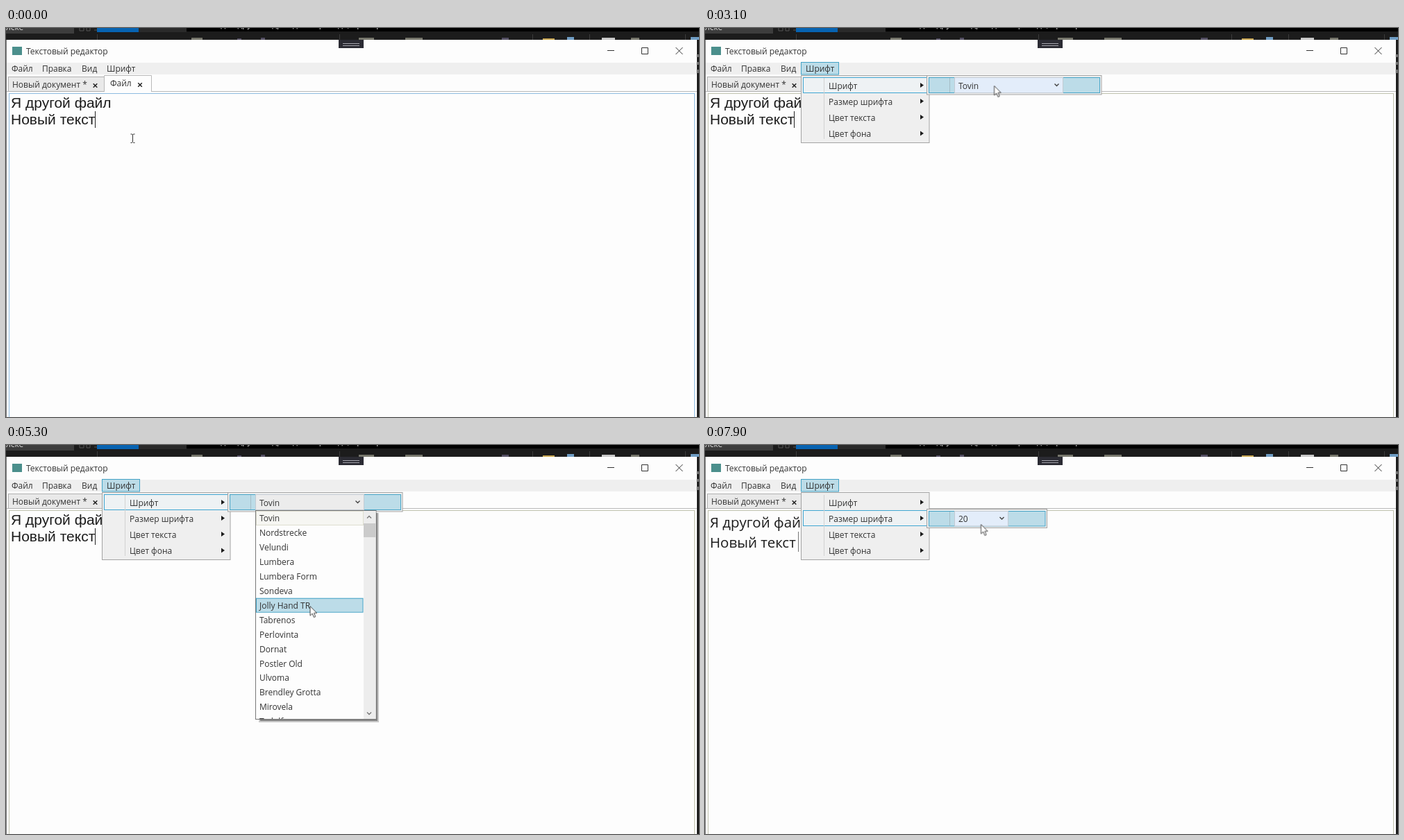
These frames come from a looping animation (998 px wide and 561 px high, 8000 ms). An HTML page:

```html
<!DOCTYPE html>
<html lang="ru">
<head>
<meta charset="utf-8">
<title>Текстовый редактор</title>
<style>
html, body { margin: 0; width: 100%; height: 100%; overflow: hidden; background: #1c1c1c; }
svg { display: block; width: 100%; height: 100%; }
text { font: 12px "Open Sans", "Noto Sans", sans-serif; fill: #333; white-space: pre; }
.plain text { font: 21px "Liberation Sans", sans-serif; fill: #1c1c1c; }
.casual text { font: 500 20.5px "Open Sans", "Noto Sans", sans-serif; fill: #1c1c1c; }
.hot { fill: #bcdce8; stroke: #45a3c6; }
.lit { fill: #eef2f4; stroke: #3fa6d2; }
.popup { fill: #efefef; stroke: #a3a3a3; }
.gutter { stroke: #d2d2d2; }
.line { fill: none; stroke: #333; }
.chevron { fill: none; stroke: #444; stroke-width: 1.4; }

/* Percentages are milliseconds / 80. */
.t { animation: 8s step-end infinite; }
.fade { animation-timing-function: linear; }
#beam { animation-name: beam; }
#arrow { animation-name: arrow; }
#pointer { animation-name: pointer; animation-timing-function: ease-in-out; }
#focus { animation-name: focus; }
#topHot { animation-name: topHot; }
#menu { animation-name: menu; }
#fontLit { animation-name: fontLit; }
#sizeLit { animation-name: sizeLit; }
#fontSub { animation-name: fontSub; }
#fontHot { animation-name: fontHot; }
#fontCombo { animation-name: fontCombo; }
#sizeSub { animation-name: sizeSub; }
#sizeHot { animation-name: sizeHot; }
#sizeCombo { animation-name: sizeCombo; }
#list { animation-name: list; }
#row { animation-name: row; }
.before { animation-name: before; }
.after { animation-name: after; }

@keyframes beam { 0% { opacity: 1 } 9.25%, 100% { opacity: 0 } }
@keyframes arrow { 0% { opacity: 0 } 9.25%, 100% { opacity: 1 } }
@keyframes pointer {
  0%, 3.1% { transform: translate(182px, 159px) }
  13.1%, 21.2% { transform: translate(174.5px, 52.5px) }
  25%, 31.8% { transform: translate(188.5px, 81.5px) }
  40%, 53.1% { transform: translate(427.5px, 83.5px); animation-timing-function: linear }
  58.1% { transform: translate(440px, 297px); animation-timing-function: linear }
  63.4%, 72.1% { transform: translate(438px, 232.5px) }
  77.5% { transform: translate(428px, 88px) }
  81.6% { transform: translate(302px, 89px) }
  85%, 94.6% { transform: translate(282px, 107.5px) }
  98.7%, 100% { transform: translate(397.5px, 114.5px) }
}
@keyframes focus { 0% { stroke: #8dbbe0 } 16.75%, 100% { stroke: #bfc1ad } }
@keyframes topHot { 0% { opacity: 0 } 11.9%, 100% { opacity: 1 } }
@keyframes menu { 0%, 16.75% { opacity: 0 } 19.25%, 100% { opacity: 1 } }
@keyframes fontLit { 0% { opacity: 0 } 23.5% { opacity: 1 } 82.5%, 100% { opacity: 0 } }
@keyframes sizeLit { 0% { opacity: 0 } 82.5%, 100% { opacity: 1 } }
@keyframes fontSub { 0%, 29.6% { opacity: 0 } 32.1%, 87.8% { opacity: 1 } 87.81%, 100% { opacity: 0 } }
@keyframes fontHot { 0% { opacity: 0 } 35.6% { opacity: 1 } 80.6%, 100% { opacity: 0 } }
@keyframes fontCombo {
  0% { fill: #ececec } 36.5% { fill: #e3edfa } 53.4% { fill: #ececec }
  76.9% { fill: #e3edfa } 79.5%, 100% { fill: #ececec }
}
@keyframes sizeSub { 0%, 88.4% { opacity: 0 } 90.9%, 100% { opacity: 1 } }
@keyframes sizeHot { 0% { opacity: 0 } 96.3%, 100% { opacity: 1 } }
@keyframes sizeCombo { 0% { fill: #ececec } 97%, 100% { fill: #e3edfa } }
@keyframes list {
  0%, 43.3% { clip-path: inset(0 0 100% 0) }
  45.5%, 68.7% { clip-path: inset(0 0 0 0) }
  68.75%, 100% { clip-path: inset(0 0 100% 0) }
}
@keyframes row {
  0% { transform: none }
  53.4% { transform: none; animation-timing-function: steps(9) }
  57.8% { transform: translateY(188.6px) }
  59.2% { transform: translateY(167.6px) }
  60.9% { transform: translateY(146.7px) }
  62.6%, 100% { transform: translateY(125.7px) }
}
@keyframes before { 0% { opacity: 1 } 69.2%, 100% { opacity: 0 } }
@keyframes after { 0% { opacity: 0 } 69.2%, 100% { opacity: 1 } }
</style>
</head>
<body>
<svg viewBox="0 0 998 561" preserveAspectRatio="none">
  <defs>
    <path id="sub" d="M0-3.5 5 0 0 3.5z" fill="#1c1c1c"/>
    <path id="x" d="M-2.8-2.8 2.8 2.8M2.8-2.8-2.8 2.8" stroke="#222" stroke-width="1.5"/>
    <path id="down" class="chevron" d="M-3-1.5 0 1.5 3-1.5"/>
  </defs>

  <!-- Strip of the program behind the window -->
  <rect width="998" height="561" fill="#1c1c1c"/>
  <path fill="#3d3d3d" d="M0 0H98V8H0z"/>
  <path fill="#0763b1" d="M131 0H191V6H131z"/>
  <path fill="#2a2a2a" d="M191 0H260V6H191z"/>
  <path fill="#000" d="M260 0H998V5H260z"/>
  <text x="0" y="3" style="fill:#ddd">лске</text>
  <text x="286" y="-1" style="fill:#ddd">Найден другой адрес для перехода, проверьте</text>
  <path fill="none" stroke="#555" d="M106 0V4H112V0M116 0V4H121V0M127 3H131"/>
  <path stroke="#3c3c3c" d="M131.500 9V17M480.500 9V17M758.500 9V17M840.500 9V17M978.500 9V17"/>
  <path fill="#77776c" d="M267 14H283V17H267zM508 14H530V17H508zM575 14H600V17H575zM900 14H912V17H900z"/>
  <path fill="#555064" d="M333 15H339V17H333zM367 14H373V17H367zM714 14H724V17H714z"/>
  <path fill="#c8a650" d="M773 15H790V17H773z"/>
  <path fill="#6f9dc4" d="M808 13H818V17H808zM986 13H998V17H986z"/>
  <path fill="#c8c8c8" d="M858 14H877V17H858z"/>

  <!-- Window frame -->
  <path fill="#fdfdfd" d="M0 17H995V561H0z"/>
  <path fill="#efefef" d="M1 50H995V67H1z"/>
  <path stroke="#777" d="M.5 17V561"/>
  <path stroke="#ddd" d="M996.500 38V42M996.500 49V53M996.500 60V65"/>
  <path fill="#2b2b33" d="M479 17H515V29H479z"/>
  <path stroke="#a5a5ad" d="M485 22.500H509M485 25.500H509"/>
  <rect x="9" y="27" width="14" height="12" fill="#4b8f8c"/>
  <text x="29" y="37.500">Текстовый редактор</text>
  <path class="line" d="M866 32.500H876M915.500 28.500H924.500V37.500H915.500zM964.500 28 974.500 38M974.500 28 964.500 38"/>

  <text x="8" y="63">Файл</text>
  <text x="52" y="63">Правка</text>
  <text x="109" y="63">Вид</text>
  <rect id="topHot" class="t hot" x="138.500" y="49.500" width="54" height="17.500"/>
  <text x="145" y="63">Шрифт</text>

  <!-- Tabs and document -->
  <path fill="#fdfdfd" stroke="#b9b9b9" d="M1 91.500H995"/>
  <rect x="3.500" y="70.500" width="138" height="21" fill="#e9e9e9" stroke="#b0b0b0"/>
  <path fill="#fdfdfd" stroke="#b9b9b9" d="M141.500 92V68.500H209.500V92"/>
  <text x="9" y="85.500">Новый документ *</text>
  <text x="150" y="84">Файл</text>
  <use href="#x" x="128.500" y="83"/>
  <use href="#x" x="193" y="82"/>
  <rect id="focus" class="t" x="4.500" y="94.500" width="987" height="480" fill="#fdfdfd"/>
  <g class="t plain before">
    <text x="7" y="114.500">Я другой файл</text>
    <text x="7" y="139">Новый текст</text>
    <path stroke="#222" d="M128.500 120V144"/>
  </g>
  <g class="t casual after">
    <text x="7" y="119">Я другой файл</text>
    <text x="7" y="147.500">Новый текст</text>
    <path stroke="#777" d="M134.500 125V154"/>
  </g>

  <!-- Font menu -->
  <g id="menu" class="t fade">
    <rect class="popup" x="138.500" y="68.500" width="184.500" height="97"/>
    <rect id="fontLit" class="t lit" x="141.500" y="71.500" width="179" height="22"/>
    <rect id="sizeLit" class="t lit" x="141.500" y="94.500" width="179" height="22"/>
    <path class="gutter" d="M171.500 72V160"/>
    <text x="178" y="87.500">Шрифт</text>
    <text x="178" y="110.500">Размер шрифта</text>
    <text x="178" y="133.500">Цвет текста</text>
    <text x="178" y="156.500">Цвет фона</text>
    <use href="#sub" x="310" y="82.500"/>
    <use href="#sub" x="310" y="105.500"/>
    <use href="#sub" x="310" y="128.500"/>
    <use href="#sub" x="310" y="152"/>
  </g>

  <g id="fontSub" class="t fade">
    <rect class="popup" x="319.500" y="68.500" width="251.500" height="27.500"/>
    <rect id="fontHot" class="t hot" x="322.500" y="71.500" width="246" height="22"/>
    <path class="gutter" d="M352.500 72V93" style="stroke:#a5bcc6"/>
    <rect id="fontCombo" class="t" x="359.500" y="71.500" width="156" height="22" stroke="#c3cbd3"/>
    <text class="t before" x="365" y="87.500">Tovin</text>
    <text class="t after" x="365" y="87.500">Jolly Hand TR</text>
    <use href="#down" x="506.500" y="82"/>
  </g>

  <g id="sizeSub" class="t fade">
    <rect class="popup" x="319.500" y="92.500" width="173" height="27"/>
    <rect id="sizeHot" class="t hot" x="322.500" y="95.500" width="167.500" height="21.500"/>
    <path class="gutter" d="M352.500 96V117" style="stroke:#a5bcc6"/>
    <rect id="sizeCombo" class="t" x="359.500" y="95.500" width="77" height="21.500" stroke="#c3cbd3"/>
    <text x="365" y="110.500">20</text>
    <use href="#down" x="427.500" y="105.500"/>
  </g>

  <!-- Drop-down list -->
  <g id="list" class="t fade">
    <path fill="#000" fill-opacity=".2" d="M364 98H537V400H364z"/>
    <path fill="#000" fill-opacity=".35" d="M366 98H535V398H366z"/>
    <rect x="359.500" y="94.500" width="173.500" height="301" fill="#fdfdfd" stroke="#777"/>
    <rect x="360.500" y="95.500" width="154" height="20" fill="#f6f6f2" stroke="#deded0"/>
    <rect id="row" class="t hot" x="360.500" y="95.500" width="153.500" height="20"/>
    <svg x="360" y="95" width="155" height="300" viewBox="360 95 155 300" style="width:155px;height:300px">
      <text y="110">
        <tspan x="365">Tovin</tspan>
        <tspan x="365" dy="20.950">Nordstrecke</tspan>
        <tspan x="365" dy="20.950">Velundi</tspan>
        <tspan x="365" dy="20.950">Lumbera</tspan>
        <tspan x="365" dy="20.950">Lumbera Form</tspan>
        <tspan x="365" dy="20.950">Sondeva</tspan>
        <tspan x="365" dy="20.950">Jolly Hand TR</tspan>
        <tspan x="365" dy="20.950">Tabrenos</tspan>
        <tspan x="365" dy="20.950">Perlovinta</tspan>
        <tspan x="365" dy="20.950">Dornat</tspan>
        <tspan x="365" dy="20.950">Postler Old</tspan>
        <tspan x="365" dy="20.950">Ulvoma</tspan>
        <tspan x="365" dy="20.950">Brendley Grotta</tspan>
        <tspan x="365" dy="20.950">Mirovela</tspan>
        <tspan x="365" dy="20.950">Tedulf</tspan>
      </text>
    </svg>
    <path fill="#ededed" d="M515 95H532.500V395H515z"/>
    <path fill="#cbcbcb" d="M515 113H532.500V133H515z"/>
    <path class="chevron" style="stroke:#777" d="M520 105.500 523 102.500 526 105.500M520 385.500 523 388.500 526 385.500"/>
  </g>

  <g id="pointer" class="t">
    <path id="beam" class="t line" d="M-2.500-6H-.5L.5-5 1.500-6H3.500M.5-5V5.500M-2.500 6.500H-.5L.5 5.500 1.500 6.500H3.500"/>
    <path id="arrow" class="t" fill="#fff" stroke="#333" stroke-width=".9" d="M0 0V13.500L3.200 10.700 5.500 16 7.700 15 5.500 9.900H9.700z"/>
  </g>
</svg>
</body>
</html>
```
